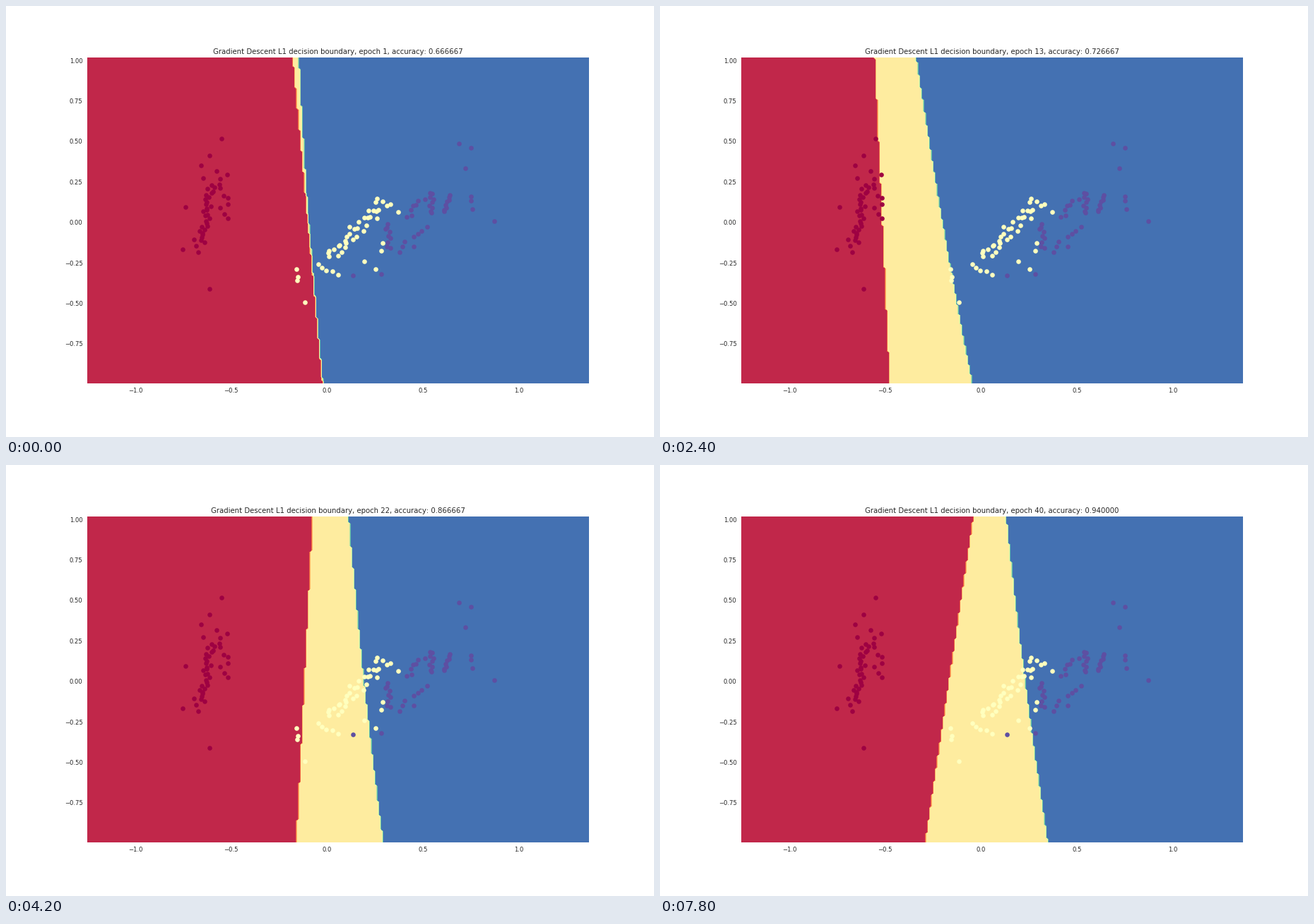
These frames come from a looping animation (917 by 611 pixels, 8000 ms). A matplotlib script:

```python
import numpy as np
import matplotlib.pyplot as plt
from matplotlib.animation import FuncAnimation

W, H, DPI = 917, 611, 64
PX = 72 / DPI                       # points per pixel
UNIT = 0.8486 * PX                  # scale of all type and marker sizes
INK = "0.15"
LEFT, RIGHT, BOTTOM, TOP = 0.125, 0.9, 0.125, 0.88
EPOCHS, STEP_MS = 40, 200

# Class grid with a step of 0.01
gx = -1.252 + 0.01 * np.arange(263)
gy = -0.993 + 0.01 * np.arange(202)
xx, yy = np.meshgrid(gx, gy)
x0, y0 = LEFT * W, (1 - TOP) * H
width, height = (RIGHT - LEFT) * W, (TOP - BOTTOM) * H
px = x0 + (xx - gx[0]) / (gx[-1] - gx[0]) * width
py = y0 + (gy[-1] - yy) / (gy[-1] - gy[0]) * height

rng = np.random.default_rng(7)


def to_data(p):
    """Stage pixels to data coordinates."""
    return (gx[0] + (p[:, 0] - x0) / width * (gx[-1] - gx[0]),
            gy[-1] - (p[:, 1] - y0) / height * (gy[-1] - gy[0]))


def band(a, b, n, spread):
    """Seeded samples strewn evenly along a line from a to b."""
    a, b = np.array(a, float), np.array(b, float)
    t = (np.arange(n)[:, None] + rng.uniform(0.2, 0.8, (n, 1))) / n
    along = (b - a) / np.hypot(*(b - a))
    side = rng.uniform(-spread, spread, (n, 1))
    return a + (b - a) * t + side * np.array([-along[1], along[0]])


# Each class: its far samples, then the bands of its core
clusters = [
    np.vstack(([(305, 188), (254, 285), (250, 345), (288, 401)],
               band((282, 206), (288, 250), 4, 12),
               band((290, 252), (277, 336), 28, 6),
               band((308, 236), (310, 304), 10, 7),
               band((264, 324), (272, 354), 3, 2))),
    np.vstack(([(554.5, 292), (423, 420), (523, 373), (507, 362)],
               band((533, 334), (531, 349), 2, 0),
               band((410, 370), (410, 396), 3, 3),
               band((436, 365), (472, 382), 5, 5),
               band((454, 356), (506, 306), 21, 10),
               band((506, 302), (540, 274), 13, 12))),
    np.vstack(([(641, 195), (658, 201), (650, 230), (690.5, 305),
                (531, 380), (491, 382)],
               band((659, 265), (660, 290), 3, 2),
               band((600, 262), (604, 296), 9, 4),
               band((628, 266), (620, 294), 8, 2),
               band((590, 270), (568, 302), 7, 6),
               band((537, 306), (543, 346), 9, 5),
               band((554, 350), (602, 318), 8, 9))),
]

# Border centres and tilts, and correct samples of 150, at the turning points
TURNS = (1, 11, 15, 22, 31, 40)
RED_EDGE, RED_TILT = (427.5, 392, 238, 423, 421, 410), (21, 16, 5, -11.5, -26, -34)
BLUE_EDGE, BLUE_TILT = (432, 484, 322, 510, 524, 520), (17, 43, 36, 24.5, 33, 29.5)
HITS = (100, 133, 85, 130, 136, 141)
COLLAPSE = 17


def predict(epoch):
    """Class of each grid node and the number of correct samples."""
    if epoch == COLLAPSE:
        is_red = py < 158 - 85 * np.exp((px - 319) / 53)
        is_blue = py < 331 - 258 * np.exp((498 - px) / 69)
        return np.where(is_red, 0, np.where(is_blue, 2, 1)), 50

    def at(keys):
        return np.interp(epoch, TURNS, keys)

    v = 2 * (py - y0) / height - 1          # -1 at the top, 1 at the bottom
    red_end = at(RED_EDGE) + at(RED_TILT) * v
    blue_start = at(BLUE_EDGE) + at(BLUE_TILT) * v - 3 * (1 - v * v)
    z = np.where(px < red_end, 0, np.where(px < blue_start, 1, 2))
    return z, round(at(HITS))


plt.rcParams["font.family"] = "DejaVu Sans"
plt.rcParams["text.kerning_factor"] = 6
fig = plt.figure(figsize=(W / DPI, H / DPI), dpi=DPI, facecolor="white")
ax = fig.add_axes((LEFT, BOTTOM, RIGHT - LEFT, TOP - BOTTOM))
ax.set_xlim(gx[0], gx[-1])
ax.set_ylim(gy[0], gy[-1])
ax.autoscale(False)
ax.set_xticks(np.arange(-1, 1.1, 0.5))
ax.set_yticks(np.arange(-0.75, 1.1, 0.25))
ax.tick_params(length=0, pad=7 * UNIT, labelsize=10 * UNIT, labelcolor=INK)
ax.spines[:].set_visible(False)
title = ax.set_title("", fontsize=12 * UNIT, color=INK, pad=6 * UNIT)

cmap = plt.get_cmap("Spectral")
for k, pts in enumerate(clusters):
    ax.scatter(*to_data(pts), s=(6 * UNIT) ** 2, color=cmap(k / 2),
               linewidths=1.75 * UNIT, zorder=3)

regions = []


def draw(i):
    epoch = i + 1
    while regions:
        regions.pop().remove()
    z, hits = predict(epoch)
    regions.append(ax.contourf(xx, yy, z, levels=np.linspace(0, 2, 9),
                               cmap=cmap, vmin=0, vmax=2, zorder=1))
    title.set_text("Gradient Descent L1 decision boundary, "
                   f"epoch {epoch}, accuracy: {hits / 150:.6f}")
    return [title]


anim = FuncAnimation(fig, draw, frames=EPOCHS, init_func=lambda: draw(0),
                     interval=STEP_MS, repeat=True, repeat_delay=0)
plt.show()
```
